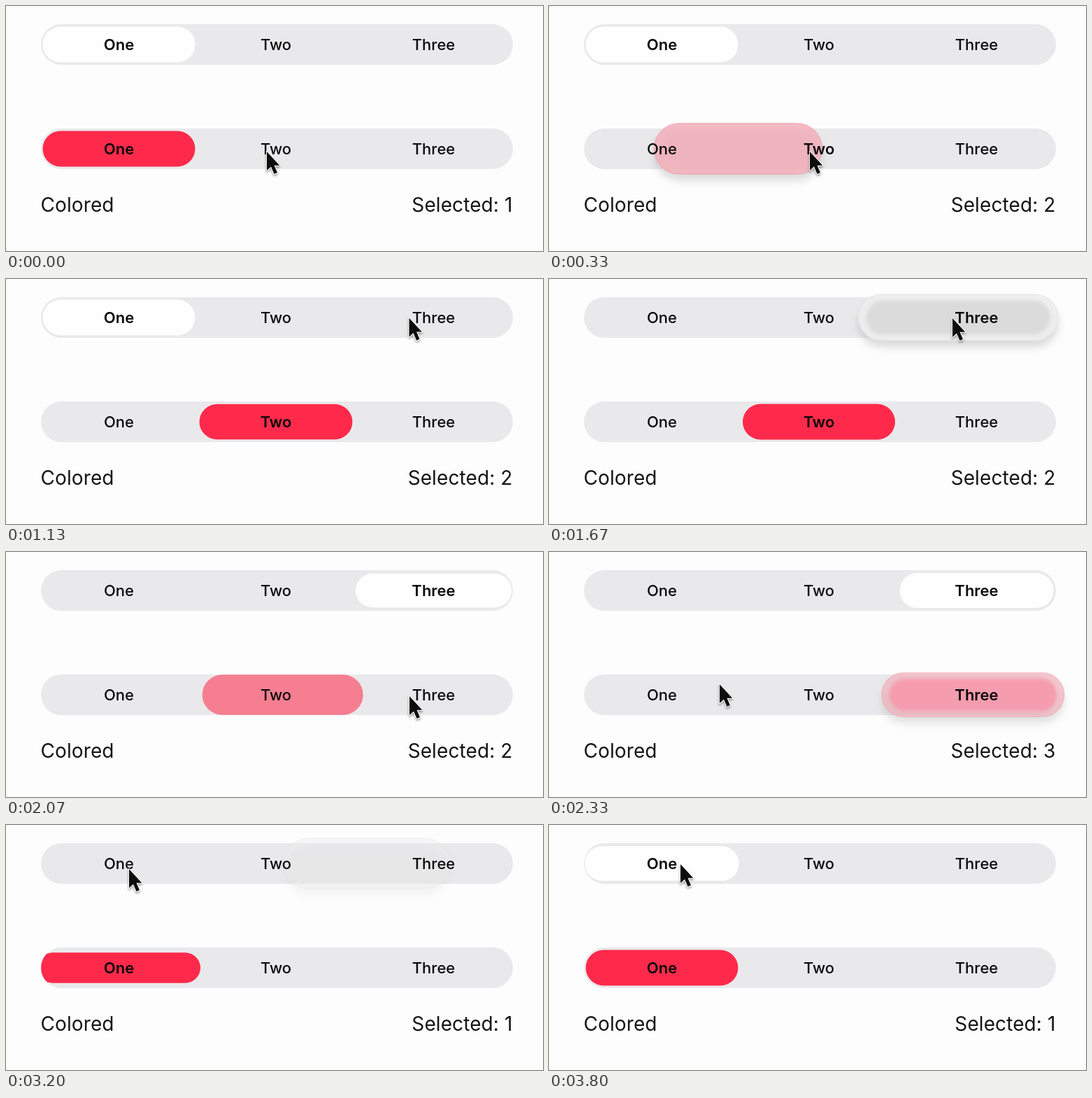
An HTML page that plays this animation: 768x350 px, repeating every 3870 ms.

```html
<!DOCTYPE html>
<html lang="en">
<head>
<meta charset="utf-8">
<title>Segmented controls</title>
<style>
  html, body { margin: 0; width: 100%; height: 100%; overflow: hidden; background: #fdfdfd; }
  svg { display: block; width: 768px; height: 350px; }
  text { font-family: Inter, "Open Sans", sans-serif; fill: #0a0a0a; }
  .segment { font-size: 22px; text-anchor: middle; }
  .caption { font-size: 28px; letter-spacing: .1px; fill: #141414; }
</style>
</head>
<body>
<svg id="stage" viewBox="0 0 768 350">
  <defs>
    <filter id="soft" x="-20%" y="-60%" width="140%" height="220%"><feGaussianBlur stdDeviation="6"/></filter>
    <filter id="edge" x="-10%" y="-20%" width="120%" height="140%"><feGaussianBlur stdDeviation="2"/></filter>
    <filter id="drop" x="-50%" y="-50%" width="200%" height="200%">
      <feDropShadow dx="0" dy="2" stdDeviation="1.5" flood-color="#000" flood-opacity=".4"/>
    </filter>
  </defs>
</svg>
<script>
const LOOP = 3870, STEP = LOOP / 58;
const CENTERS = [161.5, 386, 611.5];
const RELEASE = 130;
const stage = document.getElementById('stage');

function add(parent, tag, attrs = {}, content = '') {
  const node = document.createElementNS('http://www.w3.org/2000/svg', tag);
  set(node, attrs);
  node.textContent = content;
  return parent.appendChild(node);
}

function set(node, attrs) {
  for (const name in attrs) node.setAttribute(name, attrs[name]);
}

function ramp(value, from, to) {
  const u = Math.min(1, Math.max(0, (value - from) / (to - from)));
  return u * u * (3 - 2 * u);
}

function placePill(node, x, y, width, height, opacity) {
  set(node, { x: x - width / 2, y: y - height / 2, width, height, rx: height / 2, opacity });
}

// Stretch of the pill: swells on arrival, then rings out.
function wobbleAt(age, travel) {
  const envelope = age < 300 ? Math.min(1, age / 200) : Math.exp(-(((age - 300) / 390) ** 2));
  return Math.abs(travel) * .078 * envelope * Math.cos(2 * Math.PI * (age - 300) / 330);
}

class SegmentedControl {
  // Each tap is [time, segment index].
  constructor(id, y, colors, taps) {
    Object.assign(this, { y, taps });
    const track = { x: 50, y: y - 29, width: 675, height: 58, rx: 29 };
    add(add(stage, 'clipPath', { id }), 'rect', track);
    add(stage, 'rect', { ...track, fill: '#e9e9eb' });
    this.shadow = add(stage, 'rect', { fill: '#77777c', filter: 'url(#soft)' });
    this.glass = add(stage, 'rect', { fill: colors.glass, stroke: colors.rim, 'stroke-width': 1.5 });
    this.core = add(stage, 'rect', { fill: colors.core, filter: 'url(#edge)' });
    this.solid = add(add(stage, 'g', { 'clip-path': `url(#${id})` }), 'rect', { fill: colors.solid });
    this.labels = ['One', 'Two', 'Three'].map((word, i) =>
      add(stage, 'text', { class: 'segment', x: CENTERS[i], y: y + 8 }, word));
  }

  draw(time) {
    let from = 0, to = 0, age = 5000;
    for (const [start, index] of this.taps) {
      if (time >= start) [from, to, age] = [to, index, time - start];
    }
    const released = age >= RELEASE;
    this.selected = released ? to : from;

    const travel = CENTERS[to] - CENTERS[from];
    const x = CENTERS[from] + travel * ramp(age, 0, 340);
    const lift = ramp(age, 0, 110) * (1 - ramp(age, 280, 370));
    const wobble = wobbleAt(age, travel);
    const width = 218 + 34 * lift + wobble;
    const height = 51 + 20 * lift - wobble * (.12 + .38 * (1 - lift));
    const depth = ramp(age, 60, 190);
    const solidity = 1 - ramp(age, 0, 90) + ramp(age, 310, 400);

    placePill(this.shadow, x, this.y + 9, width, height, lift * depth * .28);
    placePill(this.glass, x, this.y, width, height, lift * (.3 + .65 * depth));
    placePill(this.core, x, this.y, width - 22, height - 17, lift * ramp(age, 150, 290) * .95);
    placePill(this.solid, x, this.y, width, height, solidity);
    this.labels.forEach((label, i) =>
      set(label, { 'font-weight': released && i === to ? 600 : 500 }));
  }
}

const plain = new SegmentedControl('plain', 55,
  { solid: '#fefefe', glass: '#efeff0', rim: '#e6e6e7', core: '#dadada' },
  [[1378, 2], [3102, 0]]);
const colored = new SegmentedControl('colored', 204,
  { solid: '#ff2a4b', glass: '#f3b3bd', rim: '#f2a8b3', core: '#fb90a6' },
  [[167, 1], [2026, 2], [2610, 0]]);

add(stage, 'text', { class: 'caption', x: 49.5, y: 294 }, 'Colored');
const status = add(stage, 'text', { class: 'caption', x: 724.5, y: 294, 'text-anchor': 'end' });

const pointer = add(stage, 'path', {
  d: 'M0 0V27L6 21.4 10.6 32 15 30.1 10.5 19.8H18.3Z',
  fill: '#080808', stroke: '#fff', 'stroke-width': 2, 'stroke-linejoin': 'round',
  'paint-order': 'stroke', filter: 'url(#drop)'
});
// Pointer stops: [time, x, y].
const stops = [
  [0, 373, 208], [330, 373, 208], [667, 437, 45], [850, 520, 18], [1150, 577, 56],
  [1680, 577, 56], [1960, 577, 206], [2090, 577, 206], [2335, 244, 189], [2520, 176, 206],
  [2640, 176, 204], [2802, 176, 96], [3050, 176, 63], [3220, 176, 63], [3800, 188, 56], [LOOP, 188, 56]
];

function drawPointer(time) {
  const next = stops.findIndex(stop => stop[0] > time);
  const [start, x0, y0] = stops[next - 1], [end, x1, y1] = stops[next];
  const u = ramp(time, start, end);
  set(pointer, { transform: `translate(${x0 + (x1 - x0) * u} ${y0 + (y1 - y0) * u})` });
}

function draw(now) {
  // The picture advances about fifteen times per second.
  const time = Math.floor((now % LOOP + 7) / STEP) % 58 * STEP;
  plain.draw(time);
  colored.draw(time);
  status.textContent = `Selected: ${colored.selected + 1}`;
  drawPointer(time);
}

const began = performance.now();
function tick() {
  draw(performance.now() - began);
  requestAnimationFrame(tick);
}
tick();
</script>
</body>
</html>
```
